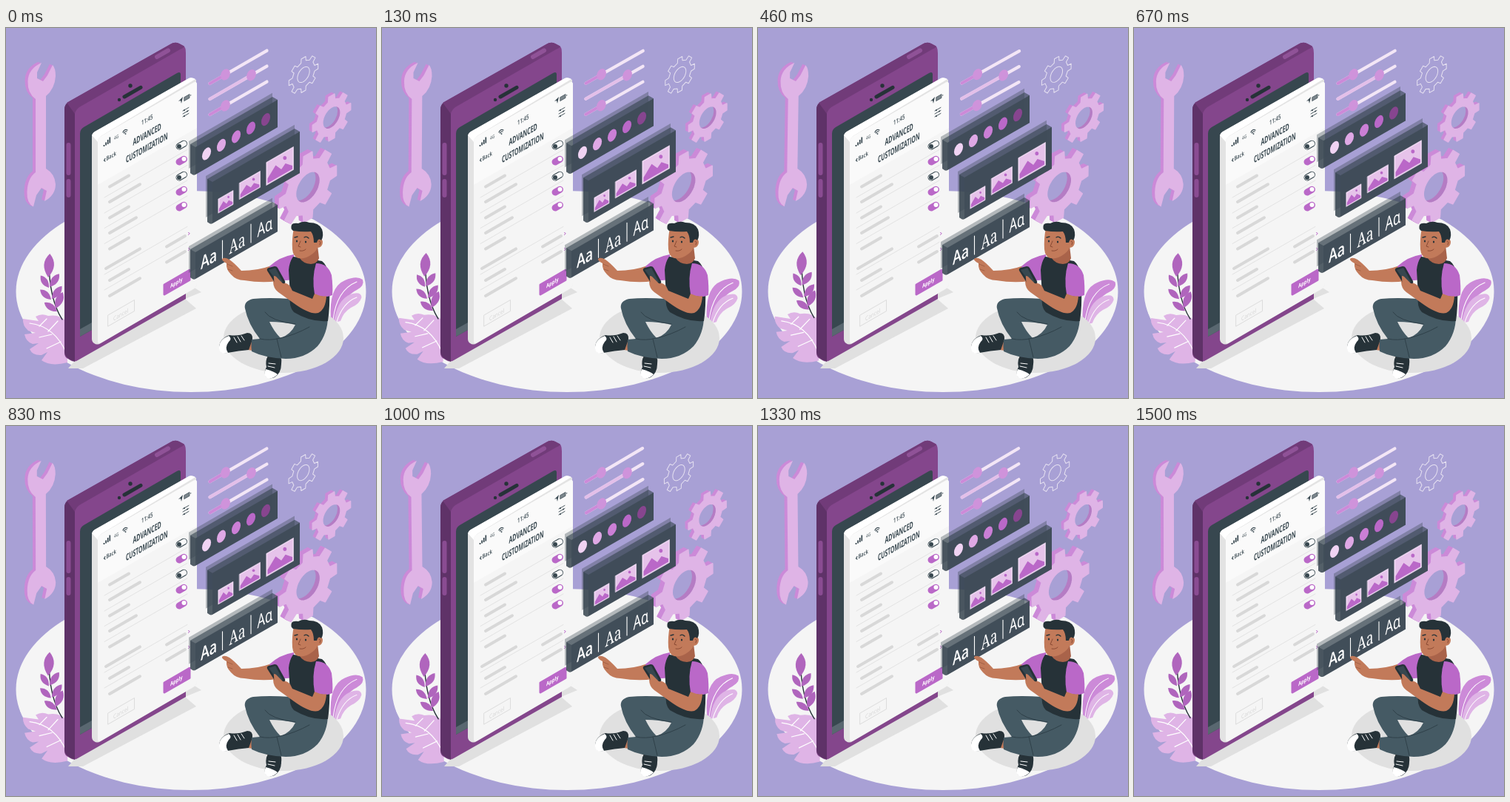
An HTML page for the animation above (1540 ms loop, 500 by 500 pixels).

```html
<!DOCTYPE html>
<html lang="en">
<head>
<meta charset="utf-8">
<title>Advanced customization</title>
<style>
html, body { margin: 0; width: 100%; height: 100%; overflow: hidden; background: #a8a0d5; }
svg { display: block; width: 100vw; height: 100vh; }
text { font-family: "Open Sans", sans-serif; }
</style>
</head>
<body>
<svg id="stage" viewBox="0 0 500 500" stroke-linecap="round" stroke-linejoin="round"></svg>
<script>
const BACK = "#a8a0d5", INK = "#37474f", DARK = "#263238", PURPLE = "#ba68c8", PALE = "#dfb4e6", MID = "#cc8ad8", SKIN = "#c27a5a";
const SLOPE = 0.577;

const path = (d, fill, extra = "") => `<path d="${d}" fill="${fill}" ${extra}/>`;
const stroke = (d, color, w, extra = "") => path(d, "none", `stroke="${color}" stroke-width="${w}" ${extra}`);
const group = (id, body) => `<g id="${id}">${body}</g>`;
const dot = (x, y, r, fill) => `<circle cx="${x}" cy="${y}" r="${r}" fill="${fill}"/>`;
// a line running along the isometric wall
const bar = (x, y, w, color, width) => stroke(`M${x} ${y}l${w} ${-w * SLOPE}`, color, width);
// an upright parallelogram on the same wall
const wall = (x, y, w, h) => `M${x} ${y}l${w} ${-w * SLOPE}v${h}l${-w} ${w * SLOPE}z`;
const label = (s, x, y, size, sx, fill, extra = "") =>
  `<text transform="matrix(${sx} ${-sx * SLOPE} 0 1 ${x} ${y})" font-size="${size}" fill="${fill}" ${extra}>${s}</text>`;
const disc = (x, y, r, fill) => `<circle r="${r}" transform="matrix(.866 -.5 0 1 ${x} ${y})" fill="${fill}"/>`;

function gearPath(cx, cy, r, hole, teeth) {
  const pt = (rad, a) => {
    const x = Math.cos(a) * rad, y = Math.sin(a) * rad;
    return `${(cx + x * 0.866).toFixed(1)} ${(cy + y - x * 0.5).toFixed(1)}`;
  };
  const step = Math.PI * 2 / teeth, pts = [], ring = [];
  for (let i = 0; i < teeth; i++) {
    const a = i * step;
    pts.push(pt(r * 0.77, a - step * 0.28), pt(r, a - step * 0.19), pt(r, a + step * 0.19), pt(r * 0.77, a + step * 0.28));
  }
  for (let i = 0; i < 40; i++) ring.push(pt(hole, i * Math.PI / 20));
  return `M${pts.join("L")}ZM${ring.join("L")}Z`;
}

function gear(cx, cy, r, hole, depth) {
  const d = gearPath(cx, cy, r, hole, 8);
  let s = "";
  for (let k = depth; k > 0; k--) s += path(d, MID, `fill-rule="evenodd" stroke="${MID}" transform="translate(${-k} ${-k * 0.5})"`);
  s += disc(cx, cy, hole, "#b57cc4") + disc(cx - depth, cy - depth * 0.5, hole, BACK);
  return s + path(d, PALE, `fill-rule="evenodd" stroke="${PALE}" stroke-width="1.5"`);
}

function wrench() {
  const d = "M48 47Q30 55 29.500 72Q29 88 40 96V195Q29 203 28.500 222Q28 237 37 241.500L41 226L48 216L55 220L52 234Q67 226 67 211Q66 197 54 190V92Q66 82 67 65Q67 54 63 50L56 64L50 72L42 68V60Z";
  let s = "";
  for (let k = 4; k > 0; k--) s += path(d, MID, `transform="translate(${-k} ${-k * 0.4})"`);
  return s + path(d, PALE);
}

function sliders() {
  return [[75, 21, MID], [96, 56, "#e3bfe9"], [117, 21, MID]].map(([y, w, color]) => {
    const x = 275.5 + w, ky = y - w * SLOPE;
    return bar(275.5, y, 77, "#f3e6f6", 4.2) + bar(275.5, y, w, color, 4.2) +
      `<ellipse cx="${x}" cy="${ky}" rx="6" ry="8" transform="rotate(25 ${x} ${ky})" fill="#cf93db"/>`;
  }).join("");
}

function plants() {
  let s = path("M83 398Q73 386 57 389Q48 385 40 390L44 396L23 393Q22 402 30 409L40 412L25 414Q27 424 36 427L44 426L32 434Q36 443 48 442L56 438L48 449Q60 458 83 452Z", PALE);
  s += stroke("M32 399Q66 403 82 440M45 403L55 393M57 410L70 396M45 418L62 414M55 433L74 424", "#fff", 1.2);
  s += stroke("M76 394Q58 366 58 314", DARK, 1.4);
  const leaf = (x, y, a, l) => path(`M0 0Q${-l * 0.42} ${-l * 0.55} 0 ${-l}Q${l * 0.42} ${-l * 0.55} 0 0`, "#b065bd", `transform="translate(${x} ${y}) rotate(${a})"`);
  s += leaf(57, 337, 4, 32) + leaf(59, 350, 36, 22) + leaf(58, 351, -34, 20) +
    leaf(62, 366, 38, 22) + leaf(61, 367, -48, 20) + leaf(67, 379, 24, 24) + leaf(69, 383, -55, 21);
  s += path("M439 393Q436 350 458 341Q474 334 482 340Q485 348 474 354Q456 362 447 397Z", MID);
  s += path("M443 398Q447 368 465 360Q480 355 480.500 364Q478 373 466 378Q456 384 452 396Z", PALE);
  s += stroke("M442 394Q447 354 474 343M447 397Q455 371 474 364", "#fff", 1);
  return s;
}

function phone() {
  let s = path("M84 460L104 460L257 379L242 366L264 357L250 348L110 430Z", "#e0e0e0");
  s += path("M79 110Q79 103 86 99L222 22Q228 18 234 21L240 24Q243 26 243 34V366L97 449Q92 452 87 449L82 446Q79 444 79 438Z", "#84468c");
  s += path("M79 110Q79 103 84 101L93 108V451Q79 446 79 438Z", "#5f3268");
  s += path("M82 101L222 22Q228 18 234 21L241 25Q240 27 235 29L99 107Q94 111 93 116Z", "#713b79");
  s += bar(204, 39, 15, "#8f5297", 6);
  s += stroke("M84.500 158V196M84.500 207V226", "#8a4c92", 6);
  s += path("M100 143Q100 137 105 134L231 61Q236 58 236 63V340L100 417Z", INK);
  s += path("M100 407L116 398V408L100 417Z", "#596770");
  s += dot(168, 78, 2.700, DARK) + dot(153, 97, 2.200, DARK) + bar(160, 93, 22, DARK, 5);
  return s;
}

function toggle(y, on) {
  return bar(234, y + 2, 6.5, on ? PURPLE : INK, 9) + (on ? "" : bar(234, y + 2, 6.5, "#fafafa", 7.2)) +
    (on ? dot(240.5, y - 2, 3, "#fff") : dot(234, y + 2, 3, INK));
}

function sheet() {
  let s = path("M116 147Q116 142 120 140L247 68Q251 66 257 70L258 344Q258 350 253 353L128 426Q123 429 119 426Q116 424 116 420Z", "#e3e3e3");
  s += path("M116 145Q117 142 120 140L247 68Q251 66 256 69L130 145Q124 149 124 154Z", "#fff");
  s += path("M124 154Q124 149 129 146L253 74Q258 71 258 77V345Q258 350 253 353L129 425Q124 428 124 423Z", "#f5f5f5");
  s += path("M124 154Q124 149 129 146L253 74Q258 71 258 77V135L124 212Z", "#fafafa");
  for (let i = 0; i < 4; i++) s += stroke(`M${132.500 + i * 2.600} ${160 - i * 1.500}v${-2 - i * 2}`, INK, 1.7, 'stroke-linecap="butt"');
  s += label("4G", 146, 151.500, 6.500, 0.75, INK) + label("11:45", 183, 131.500, 9, 0.67, INK, 'font-weight="600"');
  s += stroke("M158 141Q160 136 164 138M159.500 142Q161 139 163 140", INK, 1.2) + dot(161.500, 143, 0.9, INK);
  s += path("M233 99L239 93L237 102L236 98Z", INK);
  s += path(wall(241, 93.500, 7, 5), "#7b868c", `stroke="${INK}" stroke-width=".7"`) + bar(249.500, 91, 0.3, INK, 1.1);
  s += [109, 113, 117].map((y, i) => bar(239, y + 3, 8, INK, 0.9) + dot(i % 2 ? 245 : 241, y + (i % 2 ? -0.5 : 2), 1, INK)).join("");
  s += stroke("M134 176.500L132.500 179L134 180", INK, 1.2) + label("Back", 135.500, 179.500, 8, 0.72, INK, 'font-weight="600"');
  s += label("ADVANCED", 171.500, 159, 12.500, 0.56, INK, 'font-weight="700"');
  s += label("CUSTOMIZATION", 162, 182.500, 12.500, 0.545, INK, 'font-weight="700"');
  [229, 250, 270.500, 291.500, 333, 354].forEach(y => s += bar(133, y, 112, "#dedede", 0.8));
  [[140, 214.500, 26], [140, 235, 41], [140, 256.500, 26], [140, 277, 36], [140, 298.500, 26], [135, 325, 46],
   [140, 341, 26], [140, 362, 41], [217, 295.500, 25], [217, 316.500, 25]]
    .forEach(([x, y, w]) => s += bar(x, y, w, "#d8d8d8", 4));
  [277.500, 298.500].forEach(y => s += stroke(`M246.500 ${y - 1}l1.700 1l-1.700 2`, PURPLE, 1));
  s += [158, 179, 200, 220, 241].map((y, i) => toggle(y, i % 2 || i > 3)).join("");
  s += path(wall(214, 347, 34, 13), PURPLE, `stroke="${PURPLE}" stroke-width="3"`);
  s += label("Apply", 222, 351.500, 7.500, 0.79, "#fff", 'font-weight="700"');
  s += path(wall(138, 388, 35.500, 15), "none", 'stroke="#dcdcdc"');
  s += label("Cancel", 145, 396, 8, 0.82, "#d5d5d5");
  return s;
}

// x,y is the upper left corner of the front face
function slab(x, y, w, h) {
  const rise = w * SLOPE;
  return path(wall(x - 9, y - 8, w + 2, h), INK, 'opacity=".35"') +
    path(`M${x - 7} ${y - 4}l${w} ${-rise}l7 4v${h}l${-w} ${rise}q-2 1 -4 0l-3 -2z`, "#35434e", 'opacity=".6"') +
    path(`M${x - 7} ${y - 4}l7 4v${h}q-2 1 -4 0l-3 -2z`, "#35434e", 'opacity=".6"') +
    path(wall(x, y, w, h), "#3f4c58", 'opacity=".94"');
}

function picture(x, y, w, h) {
  const at = (u, v) => `${(x + u * w).toFixed(1)} ${(y + v * h - u * w * SLOPE).toFixed(1)}`;
  const poly = (...p) => "M" + p.map(q => at(...q)).join("L") + "Z";
  return path(wall(x, y, w, h), "#f2dcf5", 'stroke="#f2dcf5" stroke-width=".6"') +
    path(wall(x + 1.2, y + 0.6, w - 2.4, h - 2), "#e6c3ea") +
    path(poly([.04, .94], [.04, .74], [.34, .36], [.55, .68], [.7, .52], [.96, .8], [.96, .94]), PURPLE) +
    `<ellipse cx="${x + w * .68}" cy="${y + h * .27 - w * .68 * SLOPE}" rx="${w * .065}" ry="${h * .085}" fill="${PURPLE}"/>`;
}

function panels() {
  const tones = ["#f0d3f3", "#dfa8e5", "#cb7fd6", "#ba68c8", "#87458f"];
  let s = slab(256, 161, 111, 37);
  s += tones.map((c, i) => `<circle r="7" transform="matrix(.866 -.5 0 1.12 ${271 + i * 20} ${170 - i * 11.600})" fill="${c}"/>`).join("");
  s += slab(279, 208, 118, 56);
  s += picture(287, 231, 20, 19) + picture(315.500, 209.500, 28, 22) + picture(352, 181.500, 36.500, 31);
  s += slab(256, 303, 111, 36);
  s += label("Aa", 263, 326.500, 24, 0.74, "#fff", 'font-weight="600"');
  s += label("Aa", 301.500, 306, 25, 0.69, "#fff", 'style="font-family:\'Noto Serif\',serif" font-weight="500"');
  s += label("Aɑ", 339.500, 283, 24.500, 0.67, "#fff", 'style="font-family:\'Noto Sans\',sans-serif"');
  s += stroke("M292.500 287V312M331 265V290", "#fff", 1.1);
  return s;
}

function shoe(d, sole, laces) {
  return path(d, DARK) + path(sole, "#fff") + stroke(laces, "#fff", 1);
}

function person() {
  let s = `<ellipse cx="375" cy="419" rx="81" ry="47" fill="#e0e0e0"/>`;
  // reaching arm
  s += path("M359 321Q340 328 318 328Q309 318 302 313Q295 309 292 312Q291 314 298 318Q297 326 304 333Q311 341 322 341Q346 345 366 342L378 330Z", SKIN);
  s += stroke("M299 319L306 322M300 326L306 328", "#9c5b41", 0.8);
  s += path("M389 306Q370 309 356 322Q358 335 367 342L390 340Z", PURPLE);
  // feet, then legs
  s += path("M326 421L340 421L340 437L327 435Z", SKIN) + path("M352 436L371 442L369 452L354 449Z", SKIN);
  s += shoe("M333 421Q334 412 326 412Q313 417 302 415Q288 420 288 432Q290 441 299 439Q315 436 328 435Z",
    "M301 416Q287 421 288 434Q290 442 300 439Q295 432 301 424Q306 420 301 416Z", "M308 418L312 425M313 417L317 424M318 416L322 422");
  s += shoe("M354 443Q350 450 352 458Q348 466 351 471Q356 475 363 472Q372 466 372 454Q373 446 370 444Z",
    "M351 461Q347 470 353 473Q361 475 367 468Q362 464 351 461Z", "M355 453L364 454M354 457L363 459");
  s += path("M384 366Q355 364 334 366Q321 369 323 379Q327 400 343 420L332 421Q331 430 332 437Q350 446 378 447Q404 447 421 430Q435 413 435 389Z", "#455a64");
  s += path("M356 397Q374 397 391 401Q385 414 371 419Q362 410 356 397Z", "#e0e0e0");
  s += stroke("M350 384Q358 396 391 400M343 420Q356 423 371 419M371 419Q390 415 410 404M366 420Q369 432 372 445", "#2f4049", 1);
  // torso
  s += path("M388 309Q383 316 382 327L384 362Q382 377 389 384Q412 398 435 396Q438 376 437 350Q438 324 427 315L405 311Z", DARK);
  s += path("M419 318Q435 318 440 334Q442 350 441 361Q429 366 417 360Q413 337 419 318Z", PURPLE);
  s += path("M417 359Q428 364 433 362Q432 380 422 385Q411 388 389 372L368 357Q361 352 361 342Q362 337 366 338L372 345Q379 343 384 349L387 355L414 366Z", SKIN);
  // handset
  s += path("M353 328Q352 325 355 324L363 322Q366 322 367 324L377 342Q378 345 375 346L369 348Q366 349 365 347Z", DARK);
  s += path("M355 327L364 324L374 343L368 345Z", "#37474f");
  s += path("M362 338Q361 333 365 336L374 345Q381 346 383 352L375 359Q362 353 362 338Z", SKIN);
  // neck and head
  s += path("M401 303L421 294L423 311Q421 318 412 319Q401 318 397 311Z", "#a9634a");
  s += path("M389 270Q386 286 387 299Q388 309 395 311Q404 313 413 306Q419 302 421 297Q428 296 428 289Q427 283 421 285L417 268Z", SKIN);
  s += path("M388 274Q384 271 386 266Q388 263 395 264Q402 260 410 263Q423 263 427 272Q430 281 426 287Q422 283 420 290L416 290Q416 280 412 275Q400 276 388 274Z", DARK);
  s += `<ellipse cx="393" cy="288" rx="1.1" ry="1.6" fill="${DARK}"/><ellipse cx="405" cy="289" rx="1.1" ry="1.6" fill="${DARK}"/>`;
  s += stroke("M390 283L394 282M403 283Q406 281 409 284", DARK, 1.3);
  s += stroke("M398 288L395 295L398 296M397 301Q402 302 405 299M423 288Q426 288 424 293", "#854630", 0.9);
  return s;
}

document.getElementById("stage").innerHTML =
  `<rect width="500" height="500" fill="${BACK}"/><ellipse cx="250" cy="356" rx="236.5" ry="136" fill="#f5f5f5"/>` +
  group("wrench", wrench()) +
  group("gears", stroke(gearPath(402, 63, 23, 9.500, 8), "#e6e1f1", 1) + gear(440, 121, 30, 14, 4) + gear(408, 215, 45, 19, 6)) +
  group("sliders", sliders()) + group("plants", plants()) +
  phone() + sheet() + group("panels", panels()) + person();

const LOOP = 1540;
const pivots = { wrench: [46, 145], gears: [415, 155], sliders: [314, 73], plants: [253, 381] };

function draw(now) {
  const p = now % LOOP / LOOP;
  const lift = -10 * (1 - Math.abs(1 - 2 * p));
  const sway = p < 0.25 ? 4 * p : p < 0.75 ? 2 - 4 * p : 4 * p - 4;
  document.getElementById("panels").setAttribute("transform", `translate(0 ${lift})`);
  for (const id in pivots)
    document.getElementById(id).setAttribute("transform", `rotate(${sway} ${pivots[id].join(" ")})`);
}

const start = performance.now();
function tick() {
  draw(performance.now() - start);
  requestAnimationFrame(tick);
}
tick();
</script>
</body>
</html>
```
